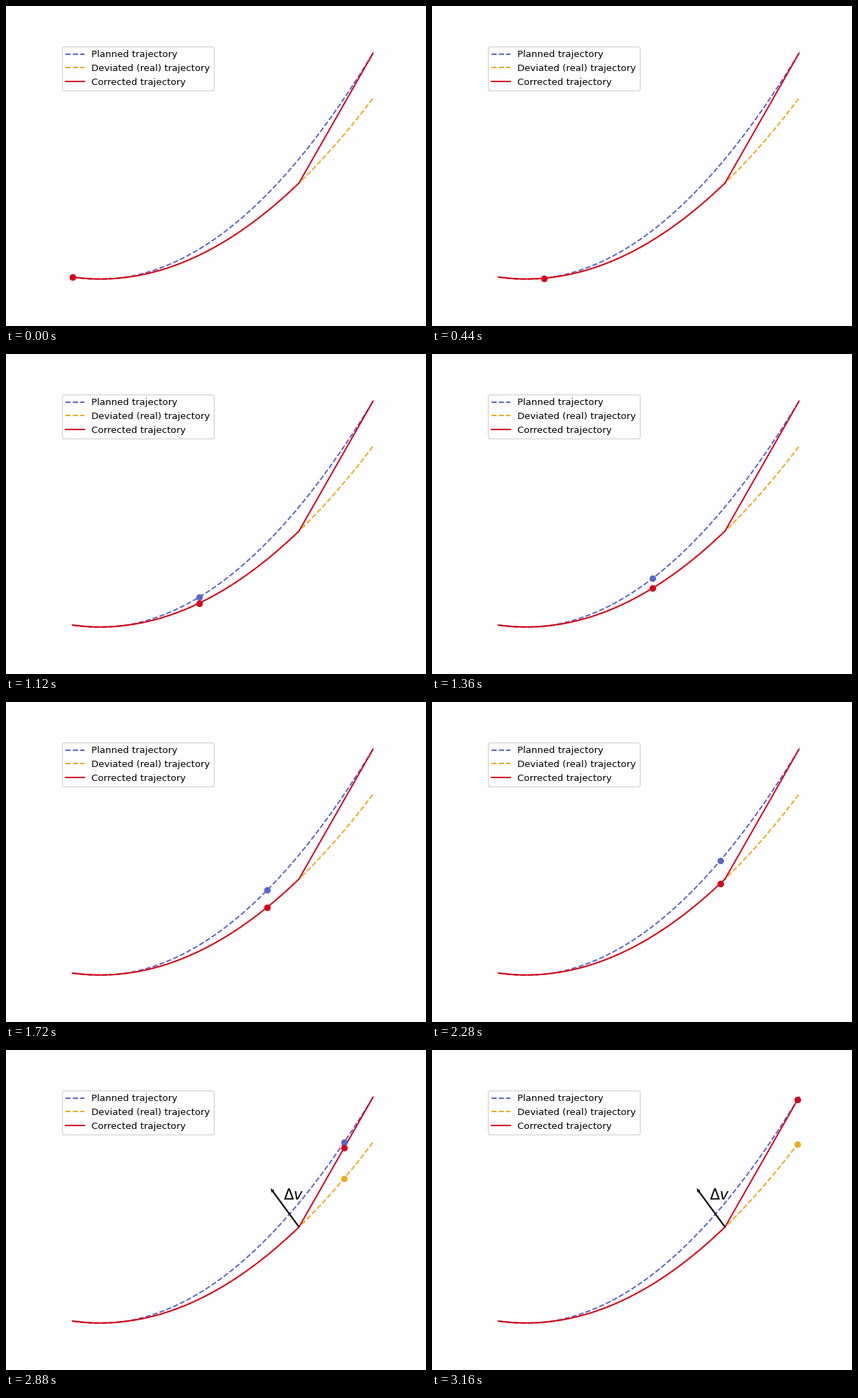
Animation, 600 px wide and 458 px high, one loop 3.32 s. Source, as a matplotlib script:

```python
import numpy as np
import matplotlib.pyplot as plt
from matplotlib.animation import FuncAnimation
from matplotlib.patches import FancyArrow

W, H, DPI = 600, 458, 100
SCALE = 0.954            # 640x480 default styling scaled to the stage
FRAMES, INTERVAL = 83, 40
STRIDE, BURN, N = 3, 150, 200

BLUE, GOLD, RED = "#5a66cc", "#ecab22", "#d60020"
PAPER = "#fefdff"

plt.rcParams.update({"font.family": "DejaVu Sans", "mathtext.fontset": "dejavusans"})

fig = plt.figure(figsize=(W / DPI, H / DPI), dpi=DPI, facecolor=PAPER)
ax = fig.add_axes([0, 0, 1, 1])
ax.set(xlim=(0, W), ylim=(H, 0))
ax.axis("off")

# Paths in stage pixels
u = np.linspace(0, 1, N)
x = 95 + 429.3 * u
planned = 388 - (390 * u**2 - 69.5 * u)
deviated = 388 - (314 * u**2 - 58 * u)
corrected = deviated.copy()
corrected[BURN:] = np.linspace(deviated[BURN], planned[-1], N - BURN)

tracks = [
    (planned, BLUE, "--", "Planned trajectory"),
    (deviated, GOLD, "--", "Deviated (real) trajectory"),
    (corrected, RED, "-", "Corrected trajectory"),
]

dots = []
for y, color, style, label in tracks:
    ax.plot(x, y, style, color=color, lw=1.5 * SCALE, label=label)
for y, color, _, _ in tracks:
    dots += ax.plot([], [], "o", color=color, ms=6 * SCALE, mew=SCALE, zorder=5)

legend = ax.legend(loc="upper left", bbox_to_anchor=(80 / W, 1 - 58 / H),
                   borderaxespad=0, fontsize=10 * SCALE)
legend.get_frame().set_linewidth(SCALE)
legend.get_frame().set_facecolor(PAPER)

ax.axhline(H - 0.5, color="#f2f2f4", lw=0.72)

# Correction impulse
x0, y0 = x[BURN], deviated[BURN]
arrow = FancyArrow(x0, y0, 378 - x0, 198 - y0, width=2.2, head_width=5,
                   head_length=6, length_includes_head=True,
                   fc="black", ec="none", zorder=3)
ax.add_patch(arrow)
delta_v = ax.text(396, 214.5, r"$\Delta v$", fontsize=16 * SCALE,
                  color="black", va="baseline", zorder=4)


def step_at(frame):
    """Steady advance with a pause just before the burn and a hold at the end."""
    return int(round(np.interp(frame, [0, 22, 34, 49, 61, 66, 79],
                               [0, 21, 34, 49, 49, 54, 66])))


def update(frame):
    i = STRIDE * step_at(frame)
    for dot, (y, *_) in zip(dots, tracks):
        dot.set_data([x[i]], [y[i]])
    burning = i >= BURN
    arrow.set_visible(burning)
    delta_v.set_visible(burning)
    return [*dots, arrow, delta_v]


anim = FuncAnimation(fig, update, frames=FRAMES, interval=INTERVAL,
                     repeat=True, repeat_delay=0, blit=False)

plt.show()
```
